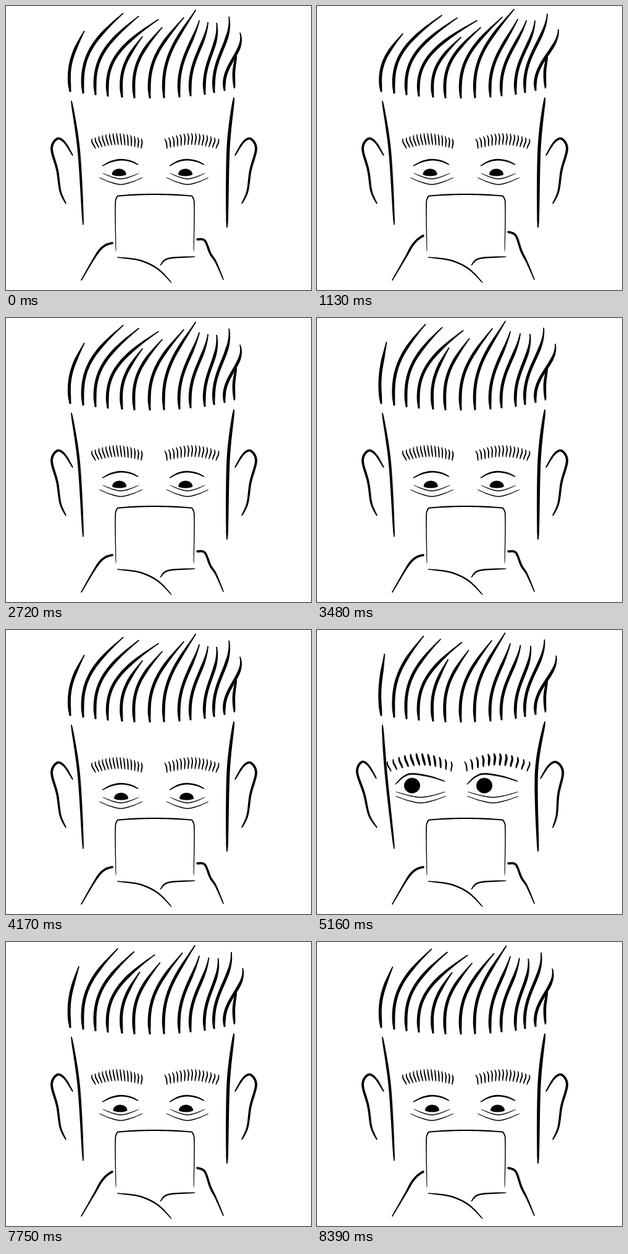
Write an HTML page with a canvas that moves like this. It is 494 px wide and 460 px high and loops after 8.44 s.

```html
<!DOCTYPE html>
<html lang="en">
<head>
<meta charset="utf-8">
<title>Reading a phone</title>
<style>
html, body { margin: 0; width: 100%; height: 100%; overflow: hidden; background: #fff; }
canvas { display: block; width: 494px; height: 460px; }
</style>
</head>
<body>
<canvas id="stage"></canvas>
<script>
const W = 494, H = 460, LOOP = 8440, CYCLE = 1750, { PI, sin, cos, min, max } = Math;
const canvas = document.getElementById('stage');
const ctx = canvas.getContext('2d');
const dpr = window.devicePixelRatio || 1;
canvas.width = W * dpr;
canvas.height = H * dpr;

// root x, tip x, tip y
const HAIR = [
  [104, 127, 41], [125, 190, 12], [145, 215, 17], [165, 247, 22], [188, 221, 50],
  [208, 253, 35], [233, 288, 19], [256, 307, 7], [281, 313, 24], [299, 327, 27],
  [322, 341, 28], [337, 361, 18], [354, 379, 44]
];
const REST = 0.27;

// per side: eye centre, half width, pupil x, brow start, brow end, ear shift
const IDLE = { open: 0, sides: [[186, 32, 186.5, 139, 219, 0], [294, 31, 292.5, 257, 344, 0]] };
const LEFT = { open: 1, sides: [[168, 43, 154, 114, 217, -12], [285, 44, 271, 239, 344, -9]] };
const RIGHT = { open: 1, sides: [[186, 38, 190, 139, 231, 4], [302, 41, 311, 257, 353, 8]] };

const EAR = [[108, 242], [95, 221], [83, 215], [74, 231], [83, 266], [88, 300], [97, 320]];
const TEMPLES = [[[106, 154], [118, 235], [125, 354]], [[369, 149], [360, 230], [358, 358]]];
const PALMS = [[[180, 407], [217, 412], [246, 426], [268, 448]], [[250, 420], [263, 409], [306, 406]]];
const THUMBS = [
  [[122, 444], [143, 408], [153, 390], [162, 379], [172, 372]],
  [[352, 443], [340, 415], [331, 397], [322, 372], [310, 366]]
];
const PHONE_HALF = [[178, 397], [177, 330], [179, 311], [189, 307], [241, 305]];
const PHONE = PHONE_HALF.concat(mirror(PHONE_HALF.slice(0, -1), 241).reverse());

function mirror(pts, axis) {
  return pts.map(([x, y]) => [2 * axis - x, y]);
}

const clamp = (v, a = 0, b = 1) => min(b, max(a, v));
const lerp = (a, b, k) => a + (b - a) * k;

function blend(a, b, k) {
  return {
    open: lerp(a.open, b.open, k),
    sides: a.sides.map((row, i) => row.map((v, j) => lerp(v, b.sides[i][j], k)))
  };
}

// place within the idle cycle; it freezes while the eyes are wide
function idleTime(t) {
  if (t < 670) return min(1640, 1180 + max(0, t - 70));
  if (t < 5160) return (t - 670) % CYCLE;
  if (t < 7130) return lerp(990, 1320, clamp((t - 6150) / 110));
  return (1320 + t - 7130) % CYCLE;
}

const SWING = [[0, 0.25], [150, -0.45], [460, 1], [660, 1], [990, -1], [1320, 1], [1640, REST], [CYCLE, 0.25]];

function sway(u) {
  const i = SWING.findIndex(k => k[0] > u);
  const [t0, a] = SWING[i - 1], [t1, b] = SWING[i];
  return lerp(a, b, 0.5 - 0.5 * cos(PI * (u - t0) / (t1 - t0)));
}

const scan = u => -3.5 * sin(PI * min(u, 1640) / 820) ** 2;

// three equal steps, the first at the start time
const steps = (t, start, gap) => clamp(Math.floor((t - start) / gap) + 1, 0, 3) / 3;

function poseAt(t) {
  if (t < 6160) return blend(IDLE, LEFT, steps(t, 5050, 55));
  if (t < 7140) return blend(LEFT, RIGHT, steps(t, 6160, 50));
  return blend(RIGHT, IDLE, steps(t, 7140, 50));
}

function thumbBend(t) {
  if (t < 4050) return clamp(0.5 + 1.5 * cos(2 * PI * t / 341.5));
  return 1 - clamp((t - 7100) / 200);
}

// smooth curve through the points
function curve(p) {
  const out = [], at = i => p[clamp(i, 0, p.length - 1)];
  for (let i = 0; i < p.length - 1; i++) {
    const [a, b, c, d] = [at(i - 1), at(i), at(i + 1), at(i + 2)];
    for (let j = 0; j < 10; j++) {
      const u = j / 10;
      out.push([0, 1].map(k => 0.5 * (2 * b[k] + (c[k] - a[k]) * u +
        (2 * a[k] - 5 * b[k] + 4 * c[k] - d[k]) * u * u +
        (3 * b[k] - a[k] - 3 * c[k] + d[k]) * u * u * u)));
    }
  }
  return out.concat([at(p.length)]);
}

function bezier(p) {
  return Array.from({ length: 31 }, (_, j) => {
    const u = j / 30, v = 1 - u;
    return [0, 1].map(k => v * v * v * p[0][k] + 3 * v * v * u * p[1][k] +
      3 * v * u * u * p[2][k] + u * u * u * p[3][k]);
  });
}

function ribbon(pts, width) {
  const last = pts.length - 1, left = [], right = [];
  pts.forEach(([x, y], i) => {
    const a = pts[max(0, i - 1)], b = pts[min(last, i + 1)];
    const dx = b[0] - a[0], dy = b[1] - a[1], len = Math.hypot(dx, dy) || 1;
    const r = width(i / last) / 2;
    left.push([x - dy / len * r, y + dx / len * r]);
    right.unshift([x + dy / len * r, y - dx / len * r]);
  });
  ctx.beginPath();
  left.concat(right).forEach(q => ctx.lineTo(q[0], q[1]));
  ctx.fill();
  for (const u of [0, 1]) {
    const [x, y] = pts[u * last];
    ctx.beginPath();
    ctx.arc(x, y, width(u) / 2, 0, 2 * PI);
    ctx.fill();
  }
}

const taper = w => u => w * (0.35 + 0.65 * max(0, sin(PI * u)) ** 0.5);
const line = (p, w) => ribbon(curve(p), taper(w));

function drawHair(s) {
  const k = s < REST ? (REST - s) / (1 + REST) : (s - REST) / (1 - REST);
  HAIR.forEach(([rx, x, y], i) => {
    const ry = 138 - 0.4 * i + 13 * sin(PI * i / 13);
    const reach = min(1, (ry - y) / 110);
    const tx = x + k * (s < REST ? (2.5 * i - 20) * reach : 12);
    const ty = y + k * (s < REST ? -2 : 4 - 0.8 * i);
    const curl = 4 * max(0, i - 5);
    ribbon(bezier([
      [tx, ty],
      [lerp(tx, rx, 0.75) + curl, lerp(ty, ry, 0.33)],
      [rx - 6, lerp(ry, ty, 0.45)],
      [rx, ry]
    ]), u => 4.9 * min(1, 0.35 + 2.2 * u, 0.6 + 5 * (1 - u)));
  });
  line([[373, 80], [369, 107], [370, 133]], 4.6);
}

function drawBrow(x0, x1, open, side) {
  const n = open > 0.5 ? 12 : 15;
  for (let i = 0; i < n; i++) {
    const u = i / (n - 1), mid = sin(PI * u);
    const x = lerp(x0, x1, u), y = 215 - 2 * open - (9 + 4 * open) * mid;
    const lean = side ? lerp(4, -4, u) : lerp(6, 0, u) + 2 * open * mid;
    const bow = side ? 1.5 : lerp(-1.5, 1.5, u), h = 16 + 3 * mid;
    line([[x, y], [x + lean * 0.3 + bow, y + h * 0.35], [x + lean * 0.7 + bow * 0.4, y + h * 0.7],
      [x + lean, y + h]], 2.1 + open * (0.2 + 1.6 * mid));
  }
}

function drawEye(c, w, px, look, open) {
  const arc = (r, y, depth, width) =>
    line([[c - r, y], [c - r / 2, y + depth * 0.65], [c, y + depth], [c + r / 2, y + depth * 0.65], [c + r, y]], width);
  const lidY = 259 - 9 * open, top = 249 - 16 * open;
  line([[c - w + 2, lidY], [lerp(c - w, px, 0.5), lerp(lidY, top, 0.7)], [px, top],
    [lerp(px, c + w, 0.5), lerp(lidY, top, 0.75)], [c + w - 4, lidY - 2 - 3 * open]], 2.7);
  arc(w - 3, 271 - 9 * open, 9, 1.5);
  arc(w + 3 - 5 * open, 278 - 9 * open, 11, 1.5);

  const x = px + look * (1 - open), y = lerp(272.5, 252, open), r = lerp(11.5, 13, open);
  ctx.beginPath();
  ctx.ellipse(x, y, r, lerp(9, 12.5, open), 0, PI, 2 * PI);
  ctx.ellipse(x, y, r, lerp(3, 12.5, open), 0, 0, PI);
  ctx.fill();
}

function draw(t) {
  const { open, sides } = poseAt(t), u = idleTime(t), bend = thumbBend(t);
  ctx.setTransform(dpr, 0, 0, dpr, 0, 0);
  ctx.fillStyle = '#fff';
  ctx.fillRect(0, 0, W, H);
  ctx.fillStyle = '#000';

  drawHair(sway(u));
  sides.forEach(([c, w, px, b0, b1, shift], side) => {
    const ear = side ? mirror(EAR, 239.5) : EAR;
    line(ear.map(([x, y], i) => [x + shift * (1 - (i / 6) ** 2), y - Math.abs(shift) * 0.15 * (1 - i / 6)]), 3.9);
    line(TEMPLES[side].map(([x, y], i) => [x + (i === 1 ? shift * 0.5 : 0), y]), side ? 5.2 : 4.2);
    drawBrow(b0, b1, open, side);
    drawEye(c, w, px, scan(u) * (side ? 0.6 : 1), open);
  });

  line(PHONE, 2.1);
  PALMS.forEach(p => line(p, 2.5));
  THUMBS.forEach(p => ribbon(
    curve(p.map(([x, y], i) => [x, y + bend * 4 * max(0, i - 1)])),
    v => 1.6 + 2 * min(1, v * 2.5)));
}

const start = performance.now();
function tick() {
  draw((performance.now() - start) % LOOP);
  requestAnimationFrame(tick);
}
tick();
</script>
</body>
</html>
```
